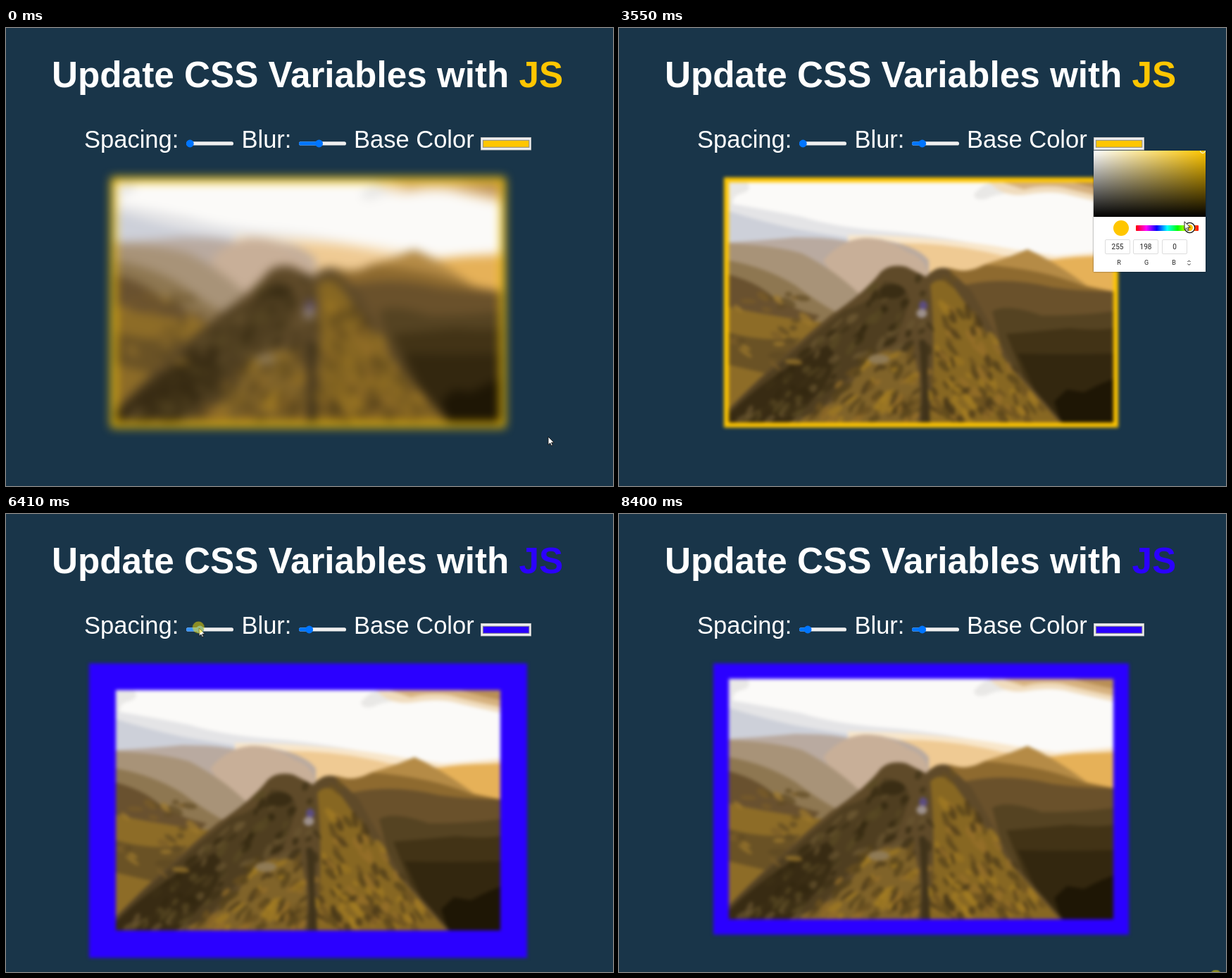
These frames come from a looping animation (862x650 px, 8510 ms). An HTML page:

```html
<!DOCTYPE html>
<html lang="en">
<head>
<meta charset="utf-8">
<title>Update CSS Variables with JS</title>
<style>
@property --pad { syntax: '<length>'; inherits: true; initial-value: 7px; }
@property --soft { syntax: '<length>'; inherits: true; initial-value: 6.8px; }
@property --hue { syntax: '<number>'; inherits: true; initial-value: 46.6; }
@property --base { syntax: '<color>'; inherits: true; initial-value: #ffc600; }
@property --shift { syntax: '<length>'; inherits: true; initial-value: 0px; }
@property --r { syntax: '<integer>'; inherits: true; initial-value: 255; }
@property --g { syntax: '<integer>'; inherits: true; initial-value: 198; }
@property --b { syntax: '<integer>'; inherits: true; initial-value: 0; }

html, body { margin: 0; width: 100%; height: 100%; overflow: hidden; background: #193549; }
svg { display: block; }
#stage {
  --loop: 8510ms infinite;
  --picked: hsl(var(--hue) 100% 50%);
  position: relative; width: 862px; height: 650px; overflow: hidden;
  font-family: "Liberation Sans", Arial, sans-serif;
  animation: spacing var(--loop) linear, soften var(--loop) linear, hue var(--loop) linear,
    base var(--loop) step-end, shift var(--loop) step-end;
}
#page { position: absolute; inset: 0; transform: translateX(var(--shift)); }
.layer { position: absolute; left: 0; top: 0; width: 862px; height: 650px; }
#page text { fill: #fff; font-size: 34.5px; }
#page .title { font-size: 51.25px; font-weight: bold; }
#page .hl { fill: var(--base); }

/* range inputs */
.track { fill: #efefef; }
.range { color: #0075ff; fill: currentColor; }
.spacing { --x: calc(261.3px + (var(--pad) - 7px) * .45); --from: 256px; animation: spacing-tone var(--loop) step-end; }
.blur { --x: calc(421.5px + var(--soft) * 3.4); --from: 416px; animation: blur-tone var(--loop) step-end; }
.range .fill { x: var(--from); width: calc(var(--x) - var(--from)); }
.range circle { cx: var(--x); }
.chip { fill: var(--picked); stroke: #8a8a8a; }

/* picture */
#photo {
  position: absolute; left: calc(156px - var(--pad)); top: 212px; padding: var(--pad);
  width: 546px; height: 341px; background: var(--base); filter: blur(var(--soft));
}

/* colour picker */
#picker {
  position: absolute; left: 674px; top: 174px; width: 159px; height: 172px;
  background: #fff; box-shadow: 0 0 2px #0009; overflow: hidden; visibility: hidden;
  animation: picker var(--loop) step-end;
  --r: calc(255 * clamp(0, max(var(--hue) / 60 - 3, 3 - var(--hue) / 60) - 1, 1));
  --g: calc(255 * clamp(0, 2 - max(var(--hue) / 60 - 2, 2 - var(--hue) / 60), 1));
  --b: calc(255 * clamp(0, 2 - max(var(--hue) / 60 - 4, 4 - var(--hue) / 60), 1));
}
#picker > * { position: absolute; box-sizing: border-box; }
.field {
  left: 0; top: 0; width: 159px; height: 94px;
  background: linear-gradient(#0000, #000), linear-gradient(90deg, #fff, #fff0), var(--picked);
}
.spot { left: 151px; top: -4px; width: 8px; height: 8px; border: 1.5px solid #fff; border-radius: 50%; }
.swatch { left: 28px; top: 99px; width: 22px; height: 22px; border-radius: 50%; background: var(--picked); }
.hues {
  left: 60px; top: 105.5px; width: 89px; height: 8.5px; border-radius: 1px;
  background: linear-gradient(90deg, #f00, #f0f, #00f, #0ff, #0f0, #ff0, #f00);
}
.knob {
  left: calc(53px + (360 - var(--hue)) * .2472px); top: 103px; width: 13px; height: 13px; border-radius: 50%;
  background: var(--picked); border: 2px solid #fff; box-shadow: 0 0 0 1.3px #111;
}
.num, .lab { width: 36px; text-align: center; color: #222; }
.num {
  top: 126px; height: 21px; border: 1px solid #ddd; border-radius: 2px; font: 10px/20px Roboto, sans-serif;
}
.num::after { content: counter(n); }
.lab { top: 153px; font: 9px/12px Roboto, sans-serif; }
.arrows { left: 132px; top: 155px; }

#bar { position: absolute; left: 854px; top: 0; width: 8px; height: 650px; background: #f3f3f3; visibility: hidden;
  animation: bar var(--loop) step-end; }
#bar::before { content: ""; position: absolute; left: 1px; top: 6px; width: 7px; height: 592px; background: #c1c1c1; }
#bar::after { content: ""; position: absolute; left: 4px; top: 648px; width: 4px; height: 2px; background: #666; }

#mouse { animation: mouse var(--loop) ease-in-out; }
#press { opacity: 0; animation: press var(--loop) step-end; }

@keyframes spacing {
  0%, 72.9% { --pad: 7px; }
  77.79%, 80.49% { --pad: 70px; }
  83.2%, 87.78% { --pad: 26.7px; }
  89.3%, 100% { --pad: 22px; }
}
@keyframes soften {
  0%, 13.87% { --soft: 6.8px; }
  16.45% { --soft: 8px; }
  23.74%, 24.32% { --soft: 4.6px; }
  26.44%, 100% { --soft: 2.7px; }
}
@keyframes hue {
  0%, 42.89% { --hue: 46.6; }
  50.76%, 100% { --hue: 250; }
}
@keyframes base { 0% { --base: #ffc600; } 57.58%, 100% { --base: #2b00ff; } }
@keyframes shift { 0% { --shift: 0px; } 75.5% { --shift: -6px; } 82.3%, 100% { --shift: 0px; } }
@keyframes bar { 0% { visibility: hidden; } 75.5% { visibility: visible; } 82.3%, 100% { visibility: hidden; } }
@keyframes picker { 0% { visibility: hidden; } 39.01% { visibility: visible; } 57.58%, 100% { visibility: hidden; } }
@keyframes blur-tone {
  0% { color: #0075ff; } 9.7% { color: #005cc8; } 13.87% { color: #3793ff; }
  27% { color: #005cc8; } 29.8%, 100% { color: #0075ff; }
}
@keyframes spacing-tone {
  0% { color: #0075ff; } 67.8% { color: #005cc8; } 70.86% { color: #3793ff; }
  89.5% { color: #005cc8; } 90.4%, 100% { color: #0075ff; }
}
@keyframes press {
  0% { opacity: 0; } 13.87% { opacity: 1; } 27% { opacity: 0; }
  38.6% { opacity: 1; } 39.2% { opacity: 0; }
  42.6% { opacity: 1; } 51.2% { opacity: 0; }
  57.3% { opacity: 1; } 57.8% { opacity: 0; }
  70.86% { opacity: 1; } 89.5% { opacity: 0; }
  98.7%, 100% { opacity: 1; }
}
@keyframes mouse {
  0%, .3% { transform: translate(770px, 580px); }
  6.1% { transform: translate(250px, 156px); }
  10.22% { transform: translate(439px, 165px); }
  11.16% { transform: translate(441px, 165px); }
  13.87% { transform: translate(445.5px, 167px); animation-timing-function: linear; }
  16.45% { transform: translate(449.5px, 167px); animation-timing-function: linear; }
  23.74%, 24.32% { transform: translate(438px, 167px); animation-timing-function: linear; }
  26.44%, 29.14% { transform: translate(432px, 166px); }
  37.6%, 39.37% { transform: translate(708px, 164px); }
  42.3%, 42.89% { transform: translate(811px, 284px); animation-timing-function: linear; }
  50.76%, 52.3% { transform: translate(760px, 284px); animation-timing-function: linear; }
  53.82% { transform: translate(776px, 299px); }
  57%, 60.05% { transform: translate(797px, 423px); }
  65% { transform: translate(310px, 127px); }
  68.51%, 72.97% { transform: translate(264px, 162px); animation-timing-function: linear; }
  77.79%, 80.49% { transform: translate(285px, 162px); animation-timing-function: linear; }
  83.2%, 87.78% { transform: translate(270px, 162px); }
  89.3% { transform: translate(268px, 162px); }
  96.94%, 100% { transform: translate(848.5px, 656.5px); }
}
</style>
</head>
<body>
<div id="stage">
  <div id="page">
    <svg class="layer" viewBox="0 0 862 650">
      <text class="title" x="65" y="84">Update CSS Variables with <tspan class="hl">JS</tspan></text>
      <text x="111" y="170">Spacing:</text>
      <text x="334.5" y="170">Blur:</text>
      <text x="494" y="170">Base Color</text>
      <rect class="track" x="256" y="161.3" width="67" height="5.2" rx="2.6"/>
      <rect class="track" x="416" y="161.3" width="67" height="5.2" rx="2.6"/>
      <g class="range spacing"><rect class="fill" y="161.3" height="5.2" rx="2.6"/><circle cy="164" r="5.4"/></g>
      <g class="range blur"><rect class="fill" y="161.3" height="5.2" rx="2.6"/><circle cy="164" r="5.4"/></g>
      <rect x="674" y="155" width="72" height="18.5" fill="#aaa"/>
      <rect x="674.7" y="155.7" width="70.6" height="17.1" fill="#efefef"/>
      <rect class="chip" x="677.3" y="159.3" width="65.6" height="10"/>
    </svg>
    <div id="photo">
      <svg width="546" height="341" viewBox="156 219 546 341">
        <path fill="#fbfaf8" d="M156 219h546v341H156z"/>
        <path fill="#e9e8e6" d="M156 219h26q9 13-12 17-10 4-8 16h-6zM504 236q14-16 26-17h30v14q-30 4-40 10-16 2-16-7z"/>
        <path fill="#f0dcbd" d="M526 219H702V251Q665 243 640 237 615 230 580 236 545 241 526 219z"/>
        <path fill="#d6b17e" d="M545 219H702V243Q660 234 630 226 600 222 575 229z"/>
        <path fill="#b98f56" d="M645 219h57v14q-30-6-57-14z"/>
        <path fill="#e4e4e6" d="M156 249Q205 257 260 268 310 284 400 290 480 298 560 318V350H156z"/>
        <path fill="#cdd0d9" d="M156 260Q200 274 250 285 300 294 340 300V330H156z"/>
        <path fill="#f8e6ca" d="M325 294Q450 294 560 314L620 323 702 316V400H325z"/>
        <path fill="#efca93" d="M375 306Q460 302 545 323L640 330 702 321V400H375z"/>
        <path fill="#e6b158" d="M608 330Q660 322 702 324V376H660z"/>
        <path fill="#b9aaa0" d="M156 304Q200 302 250 297 300 297 325 303 350 294 380 302 425 310 440 330V400H156z"/>
        <path fill="#c8af98" d="M290 330Q315 300 350 298 385 300 410 318 435 325 440 352L380 355 345 390Q308 360 290 330z"/>
        <path fill="#a89378" d="M156 306Q220 308 260 320 310 345 350 386L310 420 156 400z"/>
        <path fill="#8e7751" d="M156 330Q210 340 250 365 290 395 318 408L290 440 156 420z"/>
        <path fill="#69512f" d="M156 350Q200 362 222 385 255 402 285 408L270 424Q200 405 156 396z"/>
        <path fill="#8d6c27" d="M156 396Q220 410 290 418L280 480 156 560z"/>
        <path fill="#6a5225" d="M156 432Q200 446 258 440L216 492 156 478z"/>
        <path fill="#b58b46" d="M490 352Q505 340 530 332 555 325 580 314 620 332 665 366L702 374V420H490z"/>
        <path fill="#8e6a2f" d="M440 352Q455 336 478 343 495 348 520 336 600 342 660 366L702 374V420H510z"/>
        <path fill="#6a512b" d="M478 368Q540 350 615 368 660 374 702 374V560H540z"/>
        <path fill="#554322" d="M530 402Q550 390 600 408 660 408 702 402V560H570z"/>
        <path fill="#423316" d="M550 434Q600 430 640 426 680 430 702 426V560H600z"/>
        <path fill="#33270f" d="M566 462Q630 464 702 462V560H612z"/>
        <path fill="#1e1605" d="M628 560L618 530 636 513 660 517 682 506 702 498V560z"/>
        <path fill="#5f4a29" d="M156 560V540Q225 470 300 408 350 375 372 346 385 334 408 339L436 353Q450 337 466 341L500 372Q530 425 560 480L630 560z"/>
        <path fill="#4f3e20" d="M156 560V544Q230 470 320 400 360 390 376 360 412 360 412 390L395 440 340 480 270 560z"/>
        <path fill="#382b13" d="M156 560V548Q215 490 296 450 318 466 290 510L245 560z"/>
        <path fill="#876722" d="M442 365Q455 350 474 366 520 430 556 482L626 560H440Q452 460 442 365z"/>
        <path fill="#806329" d="M345 475Q390 442 420 468 432 510 424 560H240Q325 535 345 475z"/>
        <g id="rocks"></g>
        <path fill="#40331a" d="M426 444q12-8 13 18l-1 40 4 58h-13l2-50z"/>
        <ellipse cx="388" cy="374" rx="18" ry="10" fill="#3a2d14"/>
        <ellipse cx="369" cy="470" rx="15" ry="7" fill="#8f7a55"/>
        <ellipse cx="432" cy="394" rx="6" ry="7" fill="#5c4c80"/>
        <ellipse cx="430" cy="405" rx="7.5" ry="6.5" fill="#9d908c"/>
      </svg>
    </div>
  </div>

  <div id="picker">
    <div class="field"></div><div class="spot"></div>
    <div class="swatch"></div><div class="hues"></div><div class="knob"></div>
    <div class="num" style="left:16px;counter-reset:n var(--r)"></div>
    <div class="num" style="left:56px;counter-reset:n var(--g)"></div>
    <div class="num" style="left:97px;counter-reset:n var(--b)"></div>
    <div class="lab" style="left:18px">R</div>
    <div class="lab" style="left:57px">G</div>
    <div class="lab" style="left:96px">B</div>
    <svg class="arrows" width="7" height="9" fill="none" stroke="#222"><path d="M1.5 3l2-2 2 2M1.5 5.5l2 2 2-2"/></svg>
  </div>
  <div id="bar"></div>

  <svg class="layer" viewBox="0 0 862 650">
    <g id="mouse">
      <path d="M0 0V11.5L2.7 9 4.5 13 6.3 12.2 4.6 8.3H8.2z" fill="#fff" stroke="#111" stroke-width=".9"/>
      <circle id="press" cx="-1" cy="-1" r="8.5" fill="#ffe600" fill-opacity=".5"/>
    </g>
  </svg>
</div>
<script>
// Seeded scatter of rocks and grass over the slopes.
let seed = 7;
const rand = () => (seed = seed * 16807 % 2147483647) / 2147483647;
const between = (a, b) => a + (b - a) * rand();
const pick = list => list[Math.floor(rand() * list.length)];

const shade = ['#33280f', '#3d3016', '#6a5630', '#5a4a24'];
const grass = ['#a27c22', '#54421a', '#987129', '#6a5020', '#493818'];
const rocks = document.getElementById('rocks');

function rock(x, y, tilt, tones) {
  const el = document.createElementNS(rocks.namespaceURI, 'ellipse');
  const attrs = {
    rx: between(5, 13), ry: between(2.5, 5.5), fill: pick(tones), opacity: .7,
    transform: `translate(${x} ${y}) rotate(${tilt + between(-25, 25)})`
  };
  for (const key in attrs) el.setAttribute(key, attrs[key]);
  rocks.append(el);
}

for (let i = 0; i < 330; i++) {
  const y = 352 + 206 * Math.sqrt(rand());
  const x = between(378 - (y - 345) * 1.02, 478 + (y - 345) * .65);
  const grassy = x > 442 || (y > 460 && x > 350 - (y - 460) * .9);
  rock(x, y, x > 436 ? 55 : -45, grassy ? grass : shade);
}
for (let i = 0; i < 26; i++) rock(between(156, 270), between(372, 485), 18, ['#5f4a22', '#a07b2c', '#7a5d28']);
</script>
</body>
</html>
```
